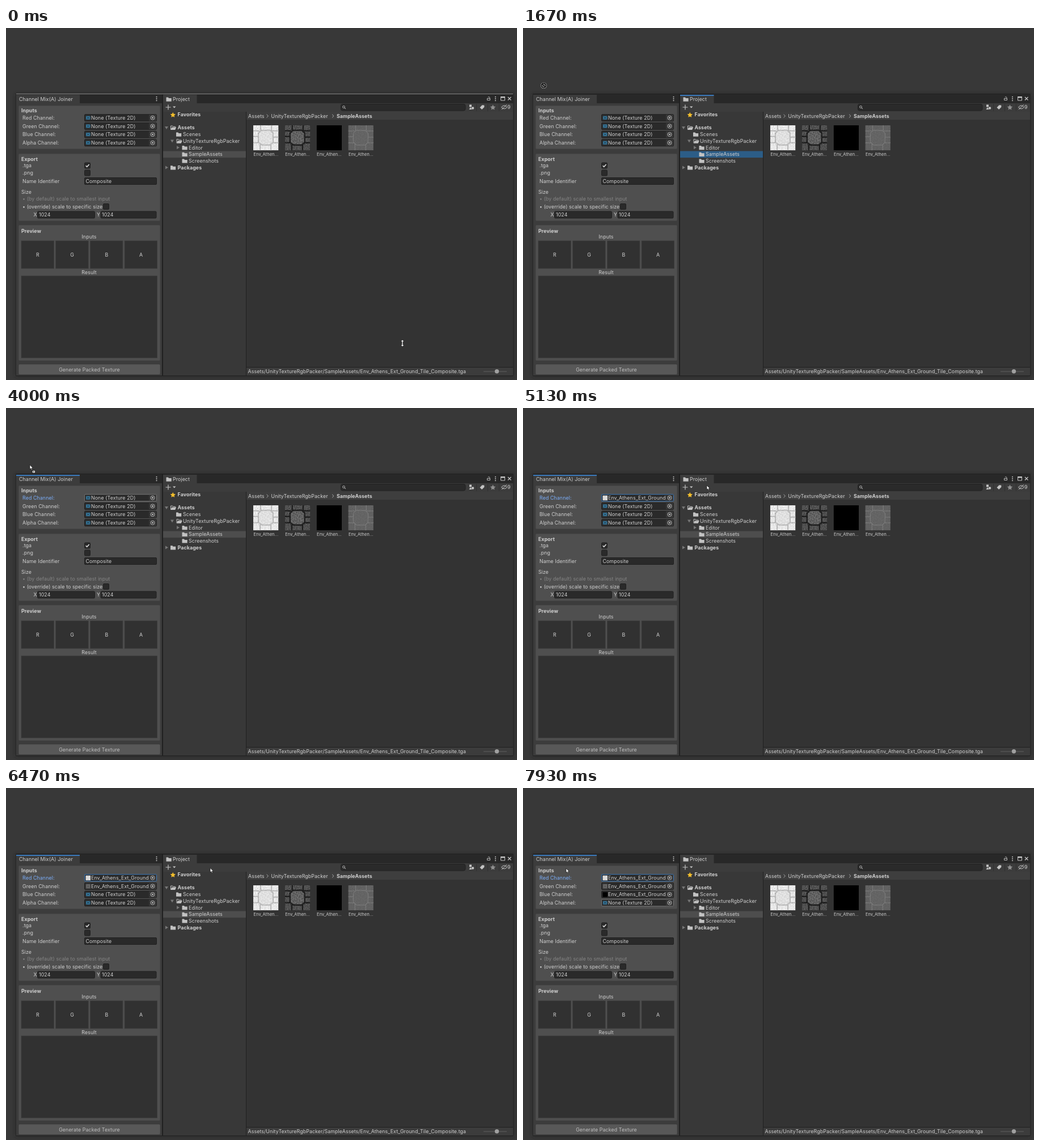
Write an HTML page that moves like this. It is 901 px wide and 622 px high and loops after 8000 ms.

```html
<!DOCTYPE html>
<html lang="en">
<head>
<meta charset="utf-8">
<title>Texture channel tool</title>
<style>
html, body { margin: 0; width: 100%; height: 100%; overflow: hidden; background: #383838; }
svg { display: block; width: 100%; height: 100%; }
text { font: 8.8px Inter, sans-serif; letter-spacing: .11px; fill: #d0d0d0; white-space: pre; }
text.bold { font-weight: 700; }
text.small { font-size: 7.33px; letter-spacing: .14px; }
</style>
</head>
<body>
<svg id="stage" viewBox="0 0 901 622">
  <defs>
    <filter id="grain" x="0" y="0" width="1" height="1">
      <feTurbulence type="fractalNoise" baseFrequency=".55" numOctaves="2" seed="4"/>
      <feColorMatrix values="0 0 0 0 0  0 0 0 0 0  0 0 0 0 0  2 0 0 0 -.6"/>
    </filter>
    <filter id="blur"><feGaussianBlur stdDeviation="3"/></filter>
    <clipPath id="thumbClip"><rect width="44.5" height="44.5"/></clipPath>
    <clipPath id="fieldClip"><rect x="139" y="150" width="113" height="60"/></clipPath>
  </defs>
</svg>
<script>
const stage = document.getElementById('stage');
let layer = stage;

function add(tag, attrs, content) {
  const node = document.createElementNS('http://www.w3.org/2000/svg', tag);
  for (const key in attrs) node.setAttribute(key, attrs[key]);
  if (content !== undefined) node.textContent = content;
  return layer.appendChild(node);
}
const rect = (x, y, width, height, fill, more) => add('rect', { x, y, width, height, fill, ...more });
const path = (d, fill, more) => add('path', { d, fill, ...more });
const line = (d, stroke, width = 1, more) =>
  path(d, 'none', { stroke, 'stroke-width': width, ...more });
// Text is placed by the vertical middle of its capitals.
const label = (x, middle, content, more) => add('text', { x, y: middle + 3.2, ...more }, content);
const bold = (x, y, content) => label(x, y, content, { class: 'bold' });
const centered = (x, y, content, more) => label(x, y, content, { 'text-anchor': 'middle', ...more });
const field = (x, y, w, h) =>
  rect(x + .5, y + .5, w - 1, h - 1, '#2a2a2a', { rx: 1.5, stroke: '#202020' });
const show = (node, on) => node.setAttribute('visibility', on ? 'visible' : 'hidden');
function group(build, attrs = {}) {
  const parent = layer, g = add('g', attrs);
  layer = g;
  build();
  layer = parent;
  return g;
}

const BLUE = '#3a79bb', SELECTED = '#2c5d87', ICON = '#c4c4c4', HOVER = '#757575';
const rows = [158.7, 173.4, 188.1, 202.8];

// Window shells
rect(0, 0, 901, 622, '#383838');
rect(17, 117, 878, 499, '#1c1c1c', { filter: 'url(#blur)', opacity: .6 });
rect(17.5, 116, 877, 499, '#202020');
rect(18, 117, 257, 16, '#282828');
rect(18, 118, 112, 15, '#3c3c3c');
rect(18, 133, 257, 481, '#3c3c3c');
rect(277, 117, 617, 16, '#282828');
rect(277, 118, 59.5, 15, '#3c3c3c');
rect(277, 133, 617, 15, '#3c3c3c');
rect(277, 148, 146, 466, '#383838');
rect(424, 148, 470, 14, '#3e3e3e');
rect(424, 162, 470, 437, '#333');
rect(424, 600, 470, 14, '#3c3c3c');
const topLine = rect(18, 116, 876, 1, '#858585');
const packerTab = rect(18, 118, 112, 2, BLUE);
const projectTab = rect(277, 118, 59.5, 2, BLUE);
label(23, 126, 'Channel Mix(A) Joiner');
function dots(x) {
  for (const y of [121.8, 125, 128.2]) add('circle', { cx: x, cy: y, r: 1, fill: ICON });
}
dots(265.5);

// Packer panel
for (const [y, h] of [[137, 77], [222, 119], [348, 240]])
  rect(22.5, y + .5, 249, h - 1, '#4f4f4f', { stroke: '#474747', rx: 1.5 });
bold(27, 146, 'Inputs');
bold(27, 232, 'Export');
bold(27, 359, 'Preview');

const channels = ['Red', 'Green', 'Blue', 'Alpha'].map((name, i) => {
  const y = rows[i];
  const title = label(29, y, name + ' Channel:');
  const frame = field(138, y - 6.5, 128, 13);
  rect(252, y - 5.5, 13, 11, '#373737');
  add('circle', { cx: 258.5, cy: y, r: 3.5, fill: 'none', stroke: ICON, 'stroke-width': .9 });
  add('circle', { cx: 258.5, cy: y, r: 1.4, fill: ICON });
  const empty = group(() => {
    rect(141, y - 3, 7.5, 6, '#397da3');
    line(`M142 ${y - 2}l5.5 4m0-4l-5.5 4`, '#24465a', 1.1);
    label(150, y, 'None (Texture 2D)');
  });
  const filled = group(() => {
    rect(140.5, y - 4, 8.5, 8.5, ['#e2e2e2', '#565656', '#000', '#666'][i]);
    if (i < 2) line(`M142.5 ${y - 2}h4.5v4.5h-4.5z`, i ? '#777' : '#c2c2c2', .8);
    label(150, y, 'Env_Athens_Ext_Ground_Tile');
  }, { 'clip-path': 'url(#fieldClip)' });
  return { title, frame, empty, filled };
});

label(29, 243, '.tga');
label(29, 256, '.png');
field(138, 237.5, 11, 11);
field(138, 250.5, 11, 11);
line('M140.7 243.2l2 2.1 4-4.3', '#e0e0e0', 1.5);
label(29, 270.7, 'Name Identifier');
field(138, 264, 128, 13);
label(140.5, 270.7, 'Composite');
label(27, 290, 'Size');
label(29, 301.7, '• (by default) scale to smallest input', { style: 'fill:#858585' });
label(29, 315.7, '• (override) scale to specific size');
field(171, 310, 11, 11);
label(48.5, 330, 'X');
field(55, 323.5, 102, 13);
label(58, 330, '1024');
label(160, 330, 'Y');
field(166.5, 323.5, 99, 13);
label(169, 330, '1024');
centered(146.5, 369, 'Inputs');
[...'RGBA'].forEach((letter, i) => {
  rect(27 + i * 60.7, 376, 57.5, 49, '#313131', { stroke: '#3d3d3d', 'stroke-width': .7 });
  centered(56 + i * 60.7, 400.5, letter);
});
centered(146.5, 432, 'Result');
rect(27, 438, 239.5, 145, '#313131', { stroke: '#3d3d3d', 'stroke-width': .7 });
rect(22, 594, 250, 18.5, '#585858', { stroke: '#3a3a3a', 'stroke-width': .7, rx: 2 });
centered(147, 603.3, 'Generate Packed Texture', { style: 'fill:#c0c0c0' });

// Project tab and toolbar
const folder = (x, y) =>
  path(`M${x} ${y - 3.5}h3.5l1 1.5h4.7v5.7h-9.2z`, '#c2c2c2');
function openFolder(x, y) {
  line(`M${x + .5} ${y + 3.5}v-6.5h3l1 1.3h4v2`, '#c2c2c2');
  path(`M${x + 2.3} ${y - .5}h7.9l-2 4.5h-7.9z`, '#c2c2c2');
}
const star = (x, y, fill) =>
  path(`M${x} ${y - 4.7}l1.4 3 3.3.4-2.4 2.3.6 3.3-2.9-1.6-2.9 1.6.6-3.3-2.4-2.3 3.3-.4z`, fill);

folder(282.5, 126);
label(294, 126, 'Project');
line('M281.5 140h9M286 135.5v9', ICON, 1.2);
path('M294 138.5h5.5l-2.75 3z', ICON);
rect(590.5, 134.5, 219.5, 11.5, '#2a2a2a', { rx: 3, stroke: '#202020' });
add('circle', { cx: 595.5, cy: 139.5, r: 1.9, fill: 'none', stroke: ICON, 'stroke-width': .9 });
line('M597 141l2 2', ICON);
line('M848.5 124.5h5v3h-5zM849.8 122.5q1.7-2.2 3 0v2', ICON, .9);
dots(863);
line('M872.5 121.5h7v6.5h-7z', ICON);
rect(872, 121, 8, 2.5, ICON);
line('M885 122l5.5 5.5m0-5.5l-5.5 5.5', ICON, 1.3);
path('M817 135.5h4v4h-4zM816.5 144l2.5-4 2.5 4z', ICON);
add('circle', { cx: 823, cy: 141.5, r: 2.2, fill: ICON });
path('M835.5 140.5l4-4.2 3.7.2.2 3.2-4.3 4.2z', ICON);
star(858.5, 140.3, '#909090');
line('M873.5 140q5-6 10 0q-5 5.5-10 0M874 144l9-8.5', ICON);
label(884, 140, '9');
line('M829.5 134v13M849.5 134v13M869.5 134v13', '#303030');

// Folder tree
const selectedRow = rect(277, 217.5, 146, 11.6, '#4d4d4d');
star(294.3, 153.5, '#f2bd2c');
bold(302.5, 153, 'Favorites');
const fold = (x, y, open) =>
  path(open ? `M${x - 3} ${y - 2}h6l-3 5z` : `M${x - 2} ${y - 3}v6l5-3z`, '#777');
fold(283, 176, true);
openFolder(290, 176);
bold(302.5, 176, 'Assets');
folder(300, 188);
label(312, 187.8, 'Scenes');
fold(293, 199.5, true);
openFolder(300.5, 199.7);
label(312, 199.5, 'UnityTextureRgbPacker');
fold(303, 211.3);
['Editor', 'SampleAssets', 'Screenshots'].forEach((name, i) => {
  folder(310.5, 211.5 + i * 11.7);
  label(322, 211.3 + i * 11.7, name);
});
fold(283, 246.5);
folder(290, 246.7);
bold(302.5, 246.5, 'Packages');

// Asset grid
label(427, 155.5, 'Assets');
label(467.5, 155.5, 'UnityTextureRgbPacker');
bold(583, 155.5, 'SampleAssets');
for (const x of [459.5, 575]) line(`M${x} 152.7l3 2.8-3 2.8`, '#a8a8a8');
const CENTER = 'M14 9H30L35 14V30L30 35H15L9 30V14Z';
const CRACKS = CENTER + 'M0 10H11M33 10H45M13 0V9M32 0V10' +
  'M0 31H10M34 31H45M12 33V45M31 35V45M0 20H9M35 21H45';
const looks = [
  { base: '#f6f6f6', crack: '#c4c4c4', center: '#eee', grain: .14, width: 2 },
  { base: '#626262', crack: '#262626', center: '#777', grain: .45, width: 2.4 },
  { base: '#000' },
  { base: '#666', crack: '#7e7e7e', center: '#696969', grain: .1, width: 1.2 },
];
const highlights = looks.map((look, i) => {
  const x = 436 + i * 55.8;
  group(() => {
    rect(0, 0, 44.5, 44.5, look.base);
    if (!look.crack) return;
    path(CENTER, look.center);
    line(CRACKS, look.crack, look.width, { 'stroke-linejoin': 'round' });
    rect(0, 0, 44.5, 44.5, '#000', { filter: 'url(#grain)', opacity: look.grain });
  }, { transform: `translate(${x} 171.8)`, 'clip-path': 'url(#thumbClip)' });
  const highlight = group(() => {
    rect(x, 171.8, 44.5, 44.5, SELECTED, { opacity: .45 });
    rect(x - 1.5, 218, 48, 11, SELECTED, { rx: 2 });
  });
  centered(x + 22.4, 223.2, 'Env_Athen...', { class: 'small' });
  return highlight;
});
label(426.5, 607, 'Assets/UnityTextureRgbPacker/SampleAssets/Env_Athens_Ext_Ground_Tile_Composite.tga');
line('M842 607h41', '#5e5e5e', 1.2);
add('circle', { cx: 865.5, cy: 606.8, r: 3.7, fill: '#a0a0a0' });

// Pointers
const pointer = group(() => {});
layer = pointer;
const outline = { stroke: '#000', 'stroke-width': .6 };
const arrow = path('M0 0V7.6L1.8 6.1 3 9 4.3 8.4 3.1 5.7H5.5Z', '#fff', outline);
const badge = rect(4.3, 9.8, 5, 4.6, '#fff', outline);
const badgeDot = rect(6, 11.3, 1.7, 1.6, '#222');
const resize = path('M0-6L2.8-3H.9V3H2.8L0 6-2.8 3H-.9V-3H-2.8Z', '#fff',
  { stroke: '#000', 'stroke-width': .4 });
const noDrop = group(() => {
  const ring = 'M-4 0a4 4 0 1 0 8 0a4 4 0 1 0-8 0M-2.8-2.8L2.8 2.8';
  line(ring, '#bbb', 2.8);
  line(ring, '#111', 1.7);
});

// Pointer stops: time, x, y
const stops = [
  [0, 699, 557], [70, 697, 555], [200, 480, 330], [400, 112, 80], [600, 200, 190],
  [770, 200, 190], [1000, 253, 150], [1380, 250, 132], [1600, 42, 129], [1665, 37, 102],
  [1930, 14, 86], [2130, 11, 88], [2395, 11, 88], [2400, 19, 98], [2600, 19, 98],
  [2730, 22, 100], [2900, 22, 100], [3070, 200, 137.5], [3230, 275, 140], [3470, 275, 142],
  [3730, 36, 98], [3900, 36, 96], [4000, 42, 100.5], [4630, 42, 100.5], [4800, 70, 110],
  [5130, 324, 136.7], [5330, 333, 140], [5470, 50, 114], [5570, 50, 114], [5800, 30, 113],
  [6230, 30, 113], [6470, 360, 141.3], [6730, 376, 150], [6900, 376, 150], [7270, 23, 128],
  [7770, 23, 128], [7930, 76, 142], [8000, 76, 142],
];
const presses = [[3230, 3560], [5190, 5390], [6850, 7050]];
const drags = [[1635, 2400], [3230, 4330], [5190, 6000], [6850, 7530]];
const focusRings = [[2930, 3230], [4670, 5190], [6270, 6850], [7800, 8000]];
const drops = [4330, 6000, 7530, Infinity];
const within = t => ([from, to]) => t >= from && t < to;

function pointerAt(t) {
  const next = Math.max(1, stops.findIndex(stop => stop[0] > t));
  const [t0, x0, y0] = stops[next - 1], [t1, x1, y1] = stops[next];
  const k = (t - t0) / (t1 - t0);
  return [x0 + (x1 - x0) * k, y0 + (y1 - y0) * k];
}

function render(t) {
  const pressed = presses.findIndex(within(t));
  const packerFocused = t >= 2930 && pressed < 0;
  const projectFocused = pressed >= 0 || (t >= 1635 && t < 2930);
  const [x, y] = pointerAt(t);
  topLine.setAttribute('fill', t < 1635 ? '#858585' : '#202020');
  show(packerTab, packerFocused);
  show(projectTab, projectFocused);
  selectedRow.setAttribute('fill', projectFocused ? SELECTED : '#4d4d4d');
  highlights.forEach((node, i) => show(node, i === pressed));

  channels.forEach((channel, i) => {
    show(channel.empty, t < drops[i]);
    show(channel.filled, t >= drops[i]);
    // The drawn pointer sits up and left of the spot it acts on.
    const hovered = t >= 2600 && x < 86 && Math.abs(y + 57 - rows[i]) < 6.5;
    const focused = i === 0 && focusRings.some(within(t));
    channel.frame.setAttribute('stroke', focused ? BLUE : hovered ? HOVER : '#202020');
  });
  channels[0].title.style.fill = packerFocused ? '#7baefa' : '';

  const resizing = t < 70, forbidden = t >= 1635 && t < 1800;
  const carrying = drags.some(within(t)) && x < 100 && !forbidden;
  pointer.setAttribute('transform', `translate(${x} ${y})`);
  show(resize, resizing);
  show(noDrop, forbidden);
  show(arrow, !resizing && !forbidden);
  show(badge, carrying);
  show(badgeDot, carrying);
}

const start = performance.now();
function tick() {
  render((performance.now() - start) % 8000);
  requestAnimationFrame(tick);
}
tick();
</script>
</body>
</html>
```
